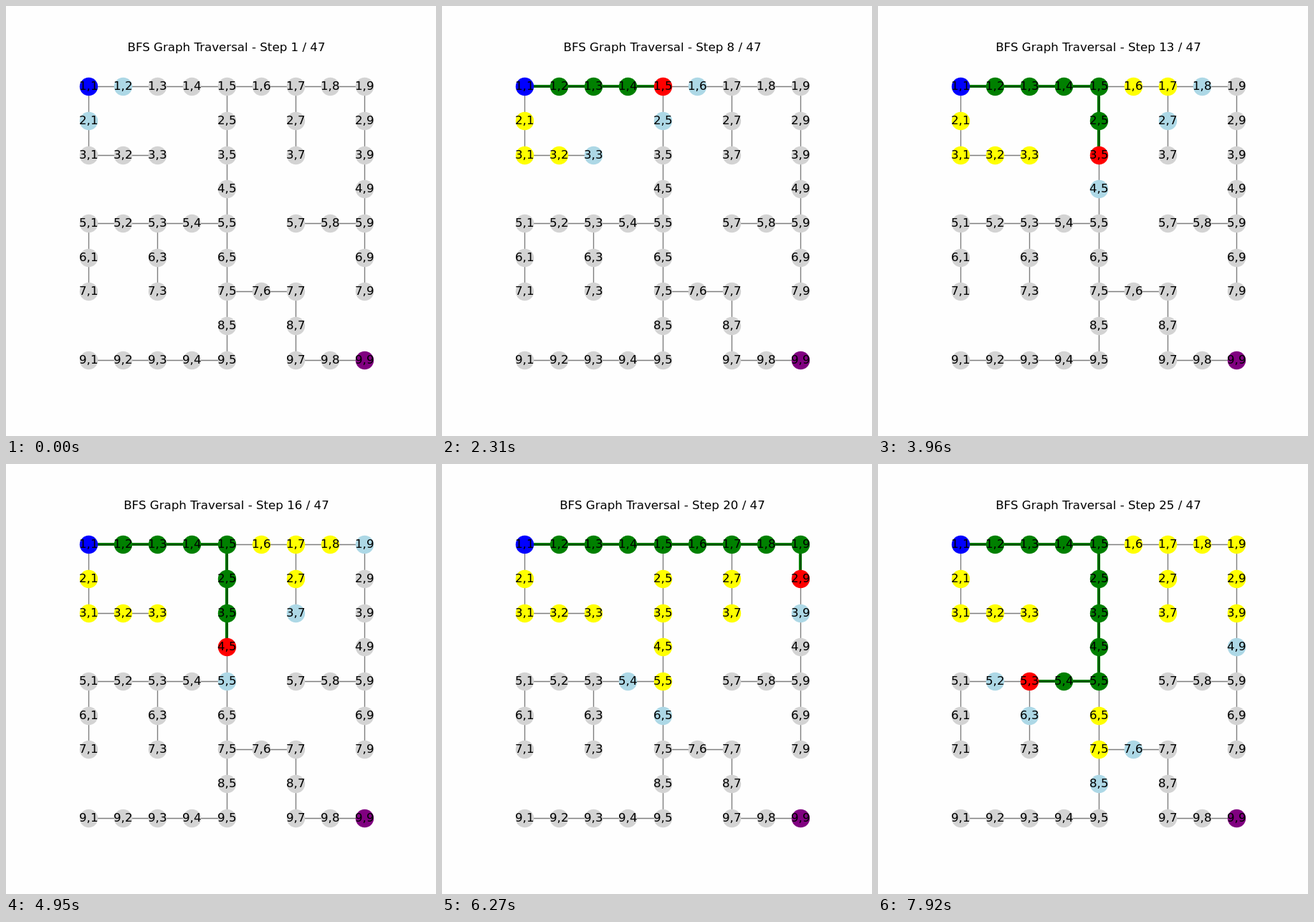
An HTML page that plays this animation: 600 px wide and 600 px high, repeating every 8 s.

```html
<!DOCTYPE html>
<html lang="en">
<head>
<meta charset="utf-8">
<title>BFS Graph Traversal</title>
<style>
  html, body { margin: 0; width: 100%; height: 100%; overflow: hidden; background: #fefefe; }
  svg { display: block; width: 100%; height: 100%; }
  text { font: 16.667px "DejaVu Sans", sans-serif; }
</style>
</head>
<body>
<svg id="stage" viewBox="0 0 600 600"></svg>
<script>
const LOOP = 8000, STEP = 330, TOTAL = 47;
const MAZE = [
  'ooooooooo',
  'o...o.o.o',
  'ooo.o.o.o',
  '....o...o',
  'ooooo.ooo',
  'o.o.o...o',
  'o.o.ooo.o',
  '....o.o..',
  'ooooo.ooo'
];
const DIRS = [[0, 1], [1, 0], [0, -1], [-1, 0]];
const COLORS = {
  idle: '#d3d3d3', queued: '#add8e6', visited: '#ffff00', path: '#008000',
  current: '#ff0000', start: '#0000ff', goal: '#800080'
};

const stage = document.getElementById('stage');

function add(parent, tag, attrs, text) {
  const el = document.createElementNS('http://www.w3.org/2000/svg', tag);
  for (const k in attrs) el.setAttribute(k, attrs[k]);
  if (text) el.textContent = text;
  return parent.appendChild(el);
}

// Cells of the maze are nodes, snapped to whole pixels; adjacent cells are connected.
const nodes = [], byKey = {};
MAZE.forEach((line, r) => [...line].forEach((ch, c) => {
  if (ch !== 'o') return;
  const node = {
    r, c, label: `${r + 1},${c + 1}`,
    x: Math.round(307.5 + 48.037 * (c - 4)),
    y: Math.round(303 + 47.727 * (r - 4))
  };
  nodes.push(node);
  byKey[node.label] = node;
}));
const neighbors = n => DIRS
  .map(([dr, dc]) => byKey[`${n.r + dr + 1},${n.c + dc + 1}`])
  .filter(Boolean);

const start = nodes[0], goal = nodes[nodes.length - 1];

// Breadth-first search: when each node is queued and visited.
const order = [start];
start.queuedAt = 0;
for (let i = 0; i < order.length; i++) {
  const node = order[i];
  node.visitedAt = i + 1;
  for (const next of neighbors(node)) {
    if (next.queuedAt !== undefined) continue;
    next.queuedAt = i + 1;
    next.parent = node;
    order.push(next);
  }
}

// Thin lines and dots sit on pixel centres, the thick trail on pixel borders.
const HALF = { transform: 'translate(.5 .5)' };
const title = add(stage, 'text', { x: 307.5, y: 63, 'text-anchor': 'middle' });
const trail = add(stage, 'path', { fill: 'none', stroke: COLORS.path, 'stroke-width': 4.17 });
const edges = add(stage, 'g', { ...HALF, stroke: '#000', 'stroke-opacity': 0.5, 'stroke-width': 1.39 });
const dots = add(stage, 'g', HALF);
const labels = add(stage, 'g', {});

for (const n of nodes) {
  for (const m of neighbors(n)) {
    if (m.r > n.r || m.c > n.c) add(edges, 'line', { x1: n.x, y1: n.y, x2: m.x, y2: m.y });
  }
  n.dot = add(dots, 'circle', { cx: n.x, cy: n.y, r: 12.7 });
  add(labels, 'text', { x: n.x - 13, y: n.y + 5 }, n.label);
}

function stateOf(node, step, current, path) {
  if (node === start) return 'start';
  if (node === goal) return 'goal';
  if (node === current) return 'current';
  if (path.includes(node)) return 'path';
  if (node.visitedAt <= step) return 'visited';
  return node.queuedAt <= step ? 'queued' : 'idle';
}

let shown = 0;
function draw(time) {
  const step = Math.floor((time % LOOP) / STEP) + 1;
  if (step === shown) return;
  shown = step;
  const current = order[step - 1], path = [];
  for (let n = current; n; n = n.parent) path.push(n);
  title.textContent = `BFS Graph Traversal - Step ${step} / ${TOTAL}`;
  trail.setAttribute('d', 'M' + path.map(n => `${n.x},${n.y}`).join('L'));
  for (const n of nodes) n.dot.setAttribute('fill', COLORS[stateOf(n, step, current, path)]);
}

const t0 = performance.now();
function tick() {
  draw(performance.now() - t0);
  requestAnimationFrame(tick);
}
tick();
</script>
</body>
</html>
```
